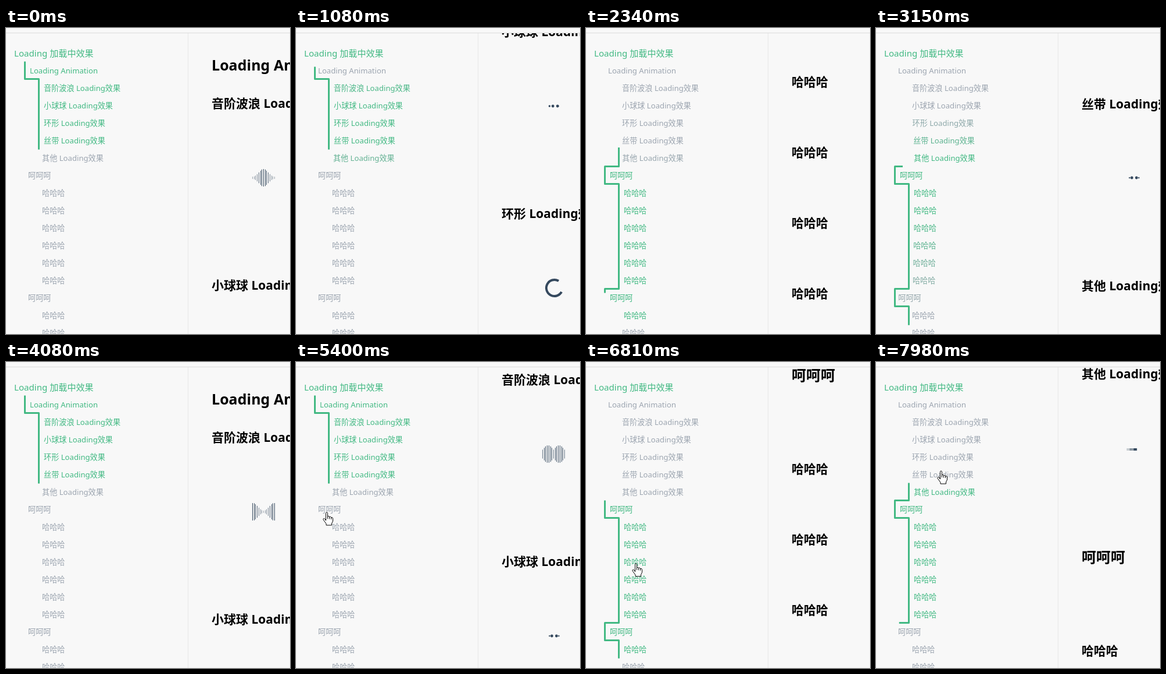
Write an HTML page that moves like this. It is 489x525 px and loops after 8 s.

```html
<!DOCTYPE html>
<html lang="zh">
<head>
<meta charset="utf-8">
<title>Loading</title>
<style>
html, body { margin: 0; width: 100%; height: 100%; overflow: hidden; background: #f8f8f8; }
svg { display: block; }
text { font-family: "Noto Sans", "Noto Sans CJK SC", "Noto Sans CJK JP", "Noto Sans CJK", sans-serif; white-space: pre; }
.head { font-weight: 700; fill: #000; }
</style>
</head>
<body>
<svg id="stage" width="489" height="525" viewBox="0 0 489 525">
  <rect width="489" height="525" fill="#f8f8f8"/>
  <svg x="314" y="9" width="175" height="516" viewBox="314 9 175 516"><g id="page"></g></svg>
  <path d="M0 8.5H489" stroke="#dcdcdc"/>
  <path d="M313.5 9V525" stroke="#e8e8e8"/>
  <g id="menu"></g>
  <path id="trail" fill="none" stroke="#42b983" stroke-width="3" stroke-linejoin="round"/>
  <g id="hand" fill="#fff" stroke="#000" stroke-linejoin="round">
    <path d="M-1.5 14V1.5Q-1.5 0 0 0Q1.5 0 1.5 1.5V7Q3 5.5 4.5 7.5Q6.2 6.5 7.5 8.5Q10.5 8 10.5 11V15L8.5 19V22H-1V19.5L-6 12.5Q-6.2 9.5-3.5 11Z"/>
    <path d="M1.5 7V11M4.5 7.5V11.5M7.5 8.5V12" fill="none"/>
  </g>
  <path id="arrow" d="M0 0V16L3.7 12.5L6.2 18.5L8.7 17.5L6.2 11.6H11.3Z" fill="#fff" stroke="#000"/>
</svg>
<script>
const LOOP = 8000, VIEW = 1104, DARK = '#35495e', GREEN = [66, 185, 131], GRAY = [156, 165, 176];
const $ = id => document.getElementById(id);
const clamp = v => Math.max(0, Math.min(1, v));
const smooth = u => u * u * (3 - 2 * u);
const coast = u => 1 - (1 - u) ** 1.5;

function set(el, attrs) {
  for (const key in attrs) el.setAttribute(key, attrs[key]);
}
function add(parent, tag, attrs, label) {
  const el = document.createElementNS('http://www.w3.org/2000/svg', tag);
  set(el, attrs);
  if (label) el.textContent = label;
  return parent.appendChild(el);
}

// Runs the moves { from, to, goal } one after another
function glide(start, moves, t) {
  return moves.reduce((value, { from, to, goal, ease = smooth }) =>
    value + (goal - value) * ease(clamp((t - from) / (to - from))), start);
}

// Average of fn over the time span from t - oldest to t - newest
function recent(fn, t, oldest, newest) {
  const samples = 24;
  let sum = 0;
  for (let i = 0; i < samples; i++) sum += fn(t - newest - (oldest - newest) * (i + .5) / samples);
  return sum / samples;
}

const scrollMoves = [
  { from: 840, to: 1720, goal: 1142, ease: coast },
  { from: 1720, to: 2350, goal: 1760 },
  { from: 2854, to: 3474, goal: 0 },
  { from: 5290, to: 6040, goal: 1669 },
  { from: 7540, to: 7740, goal: 1357 }
];
const scrollAt = t => Math.round(glide(0, scrollMoves, t));

const cursorMoves = [
  { from: 4150, to: 4750, x: 53, y: 258 },
  { from: 6060, to: 6380, x: 78, y: 430 },
  { from: 6510, to: 7200, x: 98, y: 222 },
  { from: 7700, to: 7950, x: 112, y: 187 }
];
const cursorAt = (axis, start, t) => glide(start, cursorMoves.map(m => ({ ...m, goal: m[axis] })), t);

// Sections: label, position on the page, depth in the menu
const sections = [];
const section = (label, top, depth) => sections.push({ label, top, depth });
section('Loading Animation', 64, 0);
['音阶波浪', '小球球', '环形', '丝带', '其他'].forEach((name, i) => section(name + ' Loading效果', 129 + 312 * i, 1));
for (const top of [1692, 2582]) {
  section('呵呵呵', top, 0);
  for (let i = 0; i < 6; i++) section('哈哈哈', top + 160 + 121 * i, 1);
}

const menu = $('menu'), page = $('page');
add(menu, 'text', { x: 14, y: 49, 'font-size': 15.1, fill: '#42b983' }, 'Loading 加载中效果');

let outline = '', length = 0;
sections.forEach((s, i) => {
  const x = 32.5 + 24 * s.depth, y = 57.5 + 30 * i;
  outline += `${i ? 'L' : 'M'}${x} ${y}V${y + 30}`;
  if (i && s.depth !== sections[i - 1].depth) length += 24;
  s.start = length;
  s.end = length += 30;
  s.left = 38 + 24 * s.depth;
  s.item = add(menu, 'text', { x: s.left, y: 78 + 30 * i, 'font-size': 13.15 }, s.label);
  const size = s.depth ? 21 : 25;
  add(page, 'text', { class: 'head', x: 354, y: s.top + size * .36, 'font-size': size }, s.label);
  s.isOn = t => {
    const scroll = scrollAt(t), next = sections[i + 1];
    return s.top < scroll + VIEW && (!next || next.top - 24 > scroll);
  };
});
set($('trail'), { d: outline });

// Loaders
const bars = Array.from({ length: 15 }, (_, i) =>
  add(page, 'rect', { x: Math.round(424 + i * 38 / 14), width: 1, fill: DARK }));
const dotRows = [569, 1192].map(cy => Array.from({ length: 4 }, () =>
  add(page, 'circle', { cy, r: 2.4, fill: DARK })));
const ring = add(page, 'circle', { cx: 445, cy: 881, r: 14, fill: 'none', stroke: DARK,
  'stroke-width': 4, 'stroke-dasharray': '66 22' });
const blocks = [.25, .55, 1].map(opacity =>
  add(page, 'rect', { y: 1505, width: 6, height: 4, fill: DARK, opacity }));

function drawLoaders(t) {
  bars.forEach((bar, i) => {
    const level = .5 + .5 * Math.cos(Math.PI * (2 * t / 745 - Math.abs(i - 7) / 7));
    const height = 4 + 26 * level ** 1.2;
    set(bar, { y: 257 - height / 2, height, opacity: .45 + .55 * level });
  });
  const p = .5 + .5 * (2 * ((t / 562 + .96) % 1) - 1) ** 3;
  for (const [grow, left, right, shrink] of dotRows) {
    set(grow, { cx: 436.5, r: 2.4 * p });
    set(left, { cx: 436.5 + 8 * p });
    set(right, { cx: 444.5 + 8 * p });
    set(shrink, { cx: 452.5, r: 2.4 * (1 - p) });
  }
  set(ring, { transform: `rotate(${t * .36} 445 881)` });
  blocks.forEach((block, i) => {
    const phase = 2.19 + 2 * Math.PI * (t - 1710 - 85 * (2 - i)) / 975;
    set(block, { x: 441 + 12 * Math.cos(phase) });
  });
}

function drawMenu(t) {
  for (const s of sections) {
    const on = recent(s.isOn, t, 150, 0);
    const rgb = GRAY.map((c, k) => Math.round(c + (GREEN[k] - c) * on));
    set(s.item, { x: s.left + 3 * on, fill: `rgb(${rgb})` });
  }
  // The line follows the lit sections with a delay
  const start = recent(time => sections.find(s => s.isOn(time)).start, t, 400, 150);
  const end = recent(time => sections.filter(s => s.isOn(time)).pop().end, t, 400, 150) + 1;
  set($('trail'), { 'stroke-dasharray': `${end - start} 9999`, 'stroke-dashoffset': -start });
}

function drawCursor(t) {
  const x = cursorAt('x', 500, t), y = cursorAt('y', 264, t);
  const transform = `translate(${x} ${y})`;
  const show = on => ({ transform, visibility: on ? 'visible' : 'hidden' });
  set($('hand'), show(x < 170));
  set($('arrow'), show(x >= 170));
}

const begin = performance.now();
function draw() {
  const t = Math.max(0, performance.now() - begin) % LOOP;
  set(page, { transform: `translate(0 ${-scrollAt(t)})` });
  drawLoaders(t);
  drawMenu(t);
  drawCursor(t);
  requestAnimationFrame(draw);
}
draw();
</script>
</body>
</html>
```
